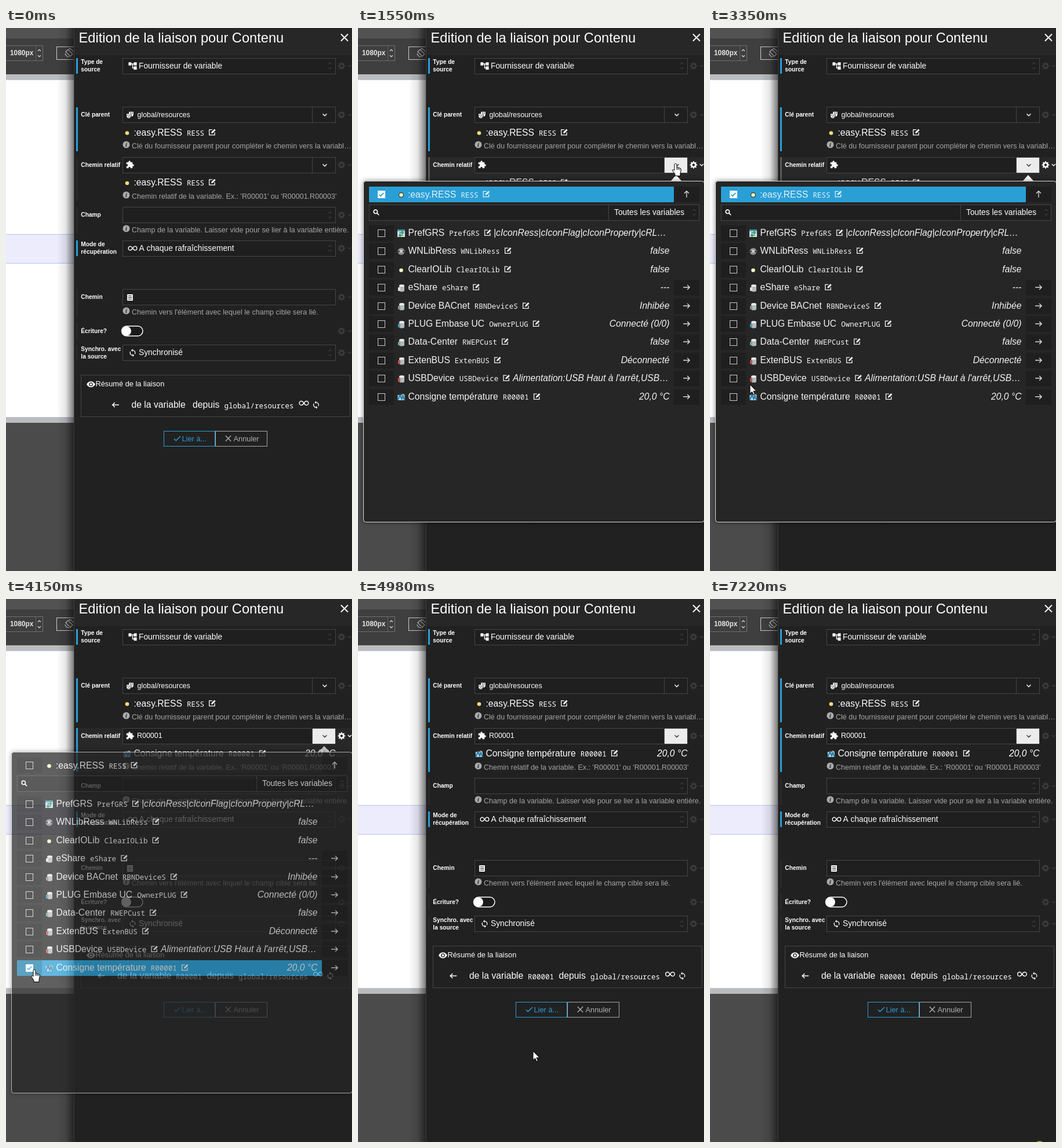
Write an HTML page with a canvas that moves like this. It is 597 px wide and 938 px high and loops after 7.29 s.

```html
<!DOCTYPE html>
<html lang="fr">
<head>
<meta charset="utf-8">
<style>
html, body { margin: 0; width: 100%; height: 100%; overflow: hidden; background: #212121; }
canvas { display: block; }
</style>
</head>
<body>
<canvas id="stage" width="597" height="938"></canvas>
<script>
const LOOP = 7290, W = 597, H = 938;
const BLUE = '#2a9fd6', EDGE = '#454545', FIELD = '#1f1f1f', CELL = '#1f1f1f', DIM = '#3b3b3b';
const SANS = '"Liberation Sans", Arial, sans-serif';
const MONO = '"Noto Sans Mono", "DejaVu Sans Mono", monospace';
const stage = document.getElementById('stage').getContext('2d');
const layer = Object.assign(document.createElement('canvas'), { width: W, height: H });
const popup = layer.getContext('2d');
let g = stage;

// Icons on a 24 unit grid
const ICON = {
  tree: 'M22 11V3h-7v3H9V3H2v8h7V8h2v10h4v3h7v-8h-7v3h-2V8h2v3z',
  puzzle: 'M20.5 11H19V7c0-1.1-.9-2-2-2h-4V3.5a2.5 2.5 0 0 0-5 0V5H4a2 2 0 0 0-2 2v3.8h1.5a2.7 2.7 0 0 1 0 5.4H2V20a2 2 0 0 0 2 2h3.8v-1.5a2.7 2.7 0 0 1 5.4 0V22H17a2 2 0 0 0 2-2v-4h1.5a2.5 2.5 0 0 0 0-5z',
  sync: 'M12 4V1L8 5l4 4V6a6 6 0 0 1 5.3 8.8l1.46 1.46A8 8 0 0 0 12 4zM12 18a6 6 0 0 1-5.3-8.8L5.24 7.74A8 8 0 0 0 12 20v3l4-4-4-4z',
  eye: 'M12 4.5C7 4.5 2.7 7.6 1 12c1.7 4.4 6 7.5 11 7.5s9.3-3.1 11-7.5c-1.7-4.4-6-7.5-11-7.5zM12 7a5 5 0 1 1 0 10a5 5 0 1 1 0-10zM12 9a3 3 0 1 1 0 6a3 3 0 1 1 0-6z',
  list: 'M3 2H21V22H3zM6 6V8H18V6zM6 11V13H18V11zM6 16V18H18V16z',
  masks: 'M9 3H22V11Q21 17 16 17V9H9zM12 5.5V7.5H15V5.5zM17 5.5V7.5H20V5.5zM2 9H14V16Q13 22 8 22T2 16zM4 12V14H7V12zM9 12V14H12V12zM5 19H11L8 16.5z',
  pencil: 'M8 16L9 11.5 17.5 3 21 6.5 12.5 15z'
};
const LINE = {
  infinity: 'M12 12C9.5 8.5 8 7 6 7a5 5 0 0 0 0 10C8.5 17 10 15 12 12S15.5 7 18 7a5 5 0 0 1 0 10C16 17 14.5 15.5 12 12',
  sheet: 'M13 4H4V20H20V12',
  down: 'M6 9L12 15 18 9', up: 'M6 15L12 9 18 15',
  cross: 'M4 4L20 20M20 4L4 20', check: 'M2 13L8 19 22 5',
  left: 'M22 12H3M10 5L3 12 10 19', right: 'M2 12H21M14 5L21 12 14 19', rise: 'M12 22V3M5 10L12 3 19 10',
  search: 'M15 15L22 22M16.5 9.5a7 7 0 1 0-14 0a7 7 0 1 0 14 0'
};
const ARROW = new Path2D('M0 0V15.5L3.6 12.3 6 17.8 8.3 16.8 6 11.3H11z');
const HAND = new Path2D('M-2 1.5Q0-1.5 2 1.5V6.5L7.5 8Q9.5 8.5 9.5 11L8 17.5V21.5H-1V18.5L-5.5 12Q-5.5 9.5-2 12z');

function rect(x, y, w, h, fill, edge) {
  if (fill) { g.fillStyle = fill; g.fillRect(x, y, w, h); }
  if (edge) { g.strokeStyle = edge; g.lineWidth = 1; g.strokeRect(x + .5, y + .5, w - 1, h - 1); }
}
function disc(x, y, r, fill) {
  g.fillStyle = fill;
  g.beginPath(); g.arc(x, y, r, 0, 7); g.fill();
}
// y is the middle of the capitals; returns the right end
function text(s, x, y, size, color = '#fff', style = '', family = SANS, align = 'left') {
  g.font = `${style} ${size}px ${family}`;
  g.textAlign = align;
  g.fillStyle = color;
  g.fillText(s, x, Math.round(y + size * .36));
  return x + g.measureText(s).width;
}
const mono = (s, x, y, color) => text(s, x, y, 12.5, color, '', MONO);
function icon(name, x, y, size, color = '#fff', weight = 1.4) {
  g.save();
  g.translate(x - size / 2, y - size / 2);
  g.scale(size / 24, size / 24);
  if (ICON[name]) {
    g.fillStyle = color;
    g.fill(new Path2D(ICON[name]), 'evenodd');
  } else {
    g.strokeStyle = color;
    g.lineWidth = weight * 24 / size;
    g.stroke(new Path2D(LINE[name]));
  }
  g.restore();
}
function edit(x, y, color) {
  icon('sheet', x, y, 14, color, 1.3);
  icon('pencil', x + 1, y - .5, 14, color);
}
function sorter(x, y) {
  icon('up', x, y - 4, 11, '#505050', 1);
  icon('down', x, y + 4, 11, '#505050', 1);
}
function gear(x, y, color) {
  g.fillStyle = color;
  g.beginPath();
  for (let i = 0; i < 32; i++) {
    const r = i % 4 < 2 ? 6.5 : 4.7, a = (i - .5) * Math.PI / 16;
    g.lineTo(x + r * Math.cos(a), y + r * Math.sin(a));
  }
  g.closePath();
  g.moveTo(x + 2.2, y);
  g.arc(x, y, 2.2, 0, 7);
  g.fill('evenodd');
  icon('down', x + 14, y, 12, color, 1.4);
}
function hint(s, y) {
  disc(207.5, y - 1.5, 6, '#aaa');
  text('i', 207.5, y - 2, 10.5, '#222', 'italic bold', '"Liberation Serif", serif', 'center');
  text(s, 217, y, 12.55, '#a6a6a6');
}
function named(name, id, x, y, color) {
  const end = mono(id, text(name, x, y, 15.7, color) + 8, y + 1, color);
  edit(end + 13.5, y, color);
}
function cylinder(x, y, accent) {
  rect(x - 4, y - 4, 9, 9, '#b4bbbe');
  g.fillStyle = '#e6ebec';
  g.beginPath(); g.ellipse(x + .5, y - 4, 4.5, 2, 0, 0, 7); g.fill();
  g.fillStyle = '#b4bbbe';
  g.beginPath(); g.ellipse(x + .5, y + 4.5, 4.5, 2, 0, 0, 7); g.fill();
  rect(x - 6, y - 1, 4, 6, accent);
}
function wave(x, y) {
  rect(x - 6, y - 4, 12, 9, '#b5d5dc');
  disc(x + 3, y - 3, 3, '#8fb389');
  g.strokeStyle = '#1f78b8'; g.lineWidth = 2;
  g.stroke(new Path2D(`M${x - 6} ${y + 5}L${x - 2} ${y - 4} ${x + 1} ${y + 3} ${x + 3} ${y - 2} ${x + 6} ${y + 5}`));
}

// label lines, top, bottom, control centre, marked as set
const ROWS = [
  [['Type de', 'source'], 52, 79, 65.5, 1], [['Clé parent'], 137, 213, 150, 1],
  [['Chemin relatif'], 223, 299, 236.5, 0], [['Champ'], 309, 356, 323, 0],
  [['Mode de', 'récupération'], 367, 394, 380.5, 1], [['Chemin'], 451, 499, 465, 0],
  [['Écriture?'], 509, 538, 523.5, 0], [['Synchro. avec', 'la source'], 548, 575, 561, 0]
];

function page() {
  rect(0, 0, 118, H, '#4b4b4b');
  rect(0, 0, 118, 18, '#525252');
  rect(0, 18, 118, 62, '#3f3f3f');
  rect(0, 80, 118, 602, '#bcbcbc');
  rect(0, 89, 118, 583, '#fff');
  rect(0, 357, 118, 50, '#ececfd');
  for (const y of [89, 356, 406, 672]) rect(0, y, 118, 1, '#b4c4ee');
  rect(-1, 30, 65, 27, null, '#707070');
  rect(51, 31, 1, 25, '#606060');
  text('1080px', 7, 43, 11.9, '#e4e4e4', 'bold');
  icon('up', 57.5, 38.5, 10, '#ddd', 1.2);
  icon('down', 57.5, 48.5, 10, '#ddd', 1.2);
  rect(87, 32, 40, 23, null, '#cfcfcf');
  g.strokeStyle = '#ccc'; g.lineWidth = 1.2;
  g.stroke(new Path2D('M107 37L115 45 111 49 103 41zM102 44a7 7 0 0 0 7 6M116 41a7 7 0 0 0-8-5'));
  const shade = g.createLinearGradient(88, 0, 118, 0);
  shade.addColorStop(0, 'rgba(0,0,0,0)');
  shade.addColorStop(.5, 'rgba(0,0,0,.1)');
  shade.addColorStop(1, 'rgba(0,0,0,.55)');
  rect(88, 0, 30, H, shade);
}

function form(hover, opened, chosen) {
  rect(117, 0, 480, H, '#212121');
  rect(117, 0, 480, 47, '#272727');
  rect(117, 0, 1, H, '#3c3c3c');
  text('Edition de la liaison pour Contenu', 125.5, 16.7, 23.66);
  icon('cross', 584, 16.5, 18, '#fff', 2);

  ROWS.forEach(([lines, top, bottom, y, set], i) => {
    const hot = i === hover;
    if (hot) rect(121, top, 476, bottom - top, '#282828');
    rect(121, top, 3, bottom - top, set || i === 2 && chosen ? BLUE : hot ? '#5a5a5a' : '#292929');
    lines.forEach((s, k) => text(s, 129.3, y - .5 + (lines.length > 1 ? k * 13 - 6.5 : 0), 10.2, '#fff', 'bold'));
    gear(579, y, hot ? '#fff' : DIM);
    if (i !== 6) rect(201, Math.round(y - 14), 368, 28, FIELD, EDGE);
    if ([0, 3, 4, 7].includes(i)) sorter(559, y);
  });

  icon('tree', 218.5, 65.5, 17);
  text('Fournisseur de variable', 229, 65.3, 13.8);

  for (const y of [150, 237]) {
    const lit = opened && y > 200;
    rect(528, y - 13, 1, 26, EDGE);
    if (lit) rect(529, y - 13, 39, 26, '#ececec');
    icon('down', 550, y, 14, lit ? '#333' : '#fff', 1.4);
  }
  icon('masks', 214, 150, 14);
  text('global/resources', 226.5, 149.8, 12.45);
  disc(209, 181.5, 3.3, '#f3dc7c');
  named(':easy.RESS', 'RESS', 220.5, 180.3, '#fff');
  hint('Clé du fournisseur parent pour compléter le chemin vers la variabl…', 203);

  icon('puzzle', 214, 236, 15);
  if (chosen) {
    text('R00001', 226, 236, 12.45);
    wave(209, 268);
    named('Consigne température', 'R00001', 220.5, 266.5, '#fff');
    text('20,0 °C', 568.5, 266.5, 15.7, '#fff', 'italic', SANS, 'right');
  } else {
    disc(209, 268, 3.3, '#f3dc7c');
    named(':easy.RESS', 'RESS', 220.5, 266.5, '#fff');
  }
  hint("Chemin relatif de la variable. Ex.: 'R00001' ou 'R00001.R00003'", 290);
  hint('Champ de la variable. Laisser vide pour se lier à la variable entière.', 348);

  icon('infinity', 218.5, 380.5, 16, '#fff', 1.4);
  text('A chaque rafraîchissement', 229.5, 380.5, 13.8);
  icon('list', 214, 465.5, 13);
  hint("Chemin vers l'élément avec lequel le champ cible sera lié.", 490);

  g.strokeStyle = '#fff'; g.lineWidth = 1.5;
  g.fillStyle = '#1a1a1a';
  g.beginPath(); g.roundRect(199.5, 515, 36.5, 17, 8.5); g.fill(); g.stroke();
  disc(208, 523.5, 8, '#fff');
  icon('sync', 218.5, 561, 15);
  text('Synchronisé', 229, 560.5, 13.8);

  rect(129, 599, 465, 73, null, EDGE);
  icon('eye', 146.5, 615.5, 16);
  text('Résumé de la liaison', 154.5, 614.7, 12.8);
  const d = chosen ? 24.5 : 0;
  icon('left', 189 - d, 651, 14, '#fff', 1.5);
  text('de la variable', 216.5 - d, 650.7, 15.7);
  if (chosen) mono('R00001', 293, 652, '#fff');
  text('depuis', 322 + d, 650.7, 15.7);
  mono('global/resources', 376.5 + d, 652, '#fff');
  icon('infinity', 514 + d, 648, 17, '#fff', 1.4);
  icon('sync', 535 + d, 651, 15);

  rect(361, 696, 90, 27, null, '#a8a8a8');
  rect(272, 696, 89, 27, null, BLUE);
  icon('check', 295.5, 709, 13, BLUE, 1.5);
  text('Lier à...', 303.5, 709, 12.8, BLUE);
  icon('cross', 383.5, 709, 14, '#b0b0b0', 1.4);
  text('Annuler', 392.5, 709, 12.8, '#b0b0b0');
}

// name, identifier, value, opens a sub level, icon accent
const ITEMS = [
  ['PrefGRS', 'PrefGRS', '|cIconRess|cIconFlag|cIconProperty|cRL…', 0, '#3c9a62'],
  ['WNLibRess', 'WNLibRess', 'false', 0],
  ['ClearIOLib', 'ClearIOLib', 'false', 0],
  ['eShare', 'eShare', '---', 1, '#dfe5e6'],
  ['Device BACnet', 'RBNDeviceS', 'Inhibée', 1, '#8b8f91'],
  ['PLUG Embase UC', 'OwnerPLUG', 'Connecté (0/0)', 1, '#4d9ab0'],
  ['Data-Center', 'RWEPCust', 'false', 1, '#77a596'],
  ['ExtenBUS', 'ExtenBUS', 'Déconnecté', 1, '#c0574e'],
  ['USBDevice', 'USBDevice', "Alimentation:USB Haut à l'arrêt,USB…", 1, '#c0574e'],
  ['Consigne température', 'R00001', '20,0 °C', 1]
];

function box(y, on, fill) {
  rect(19, y - 13, 43, 27, fill);
  rect(34, y - 6, 13, 13, on ? '#fff' : null, on ? '#fff' : '#ccc');
  if (on) icon('check', 40.5, y + .5, 9, BLUE, 1.8);
}
function itemIcon(i, y, accent) {
  if (i === 0) {
    rect(68, y - 6, 13, 13, '#cfe3e6');
    rect(68, y - 6, 13, 3, '#4a90b8');
    icon('right', 75, y - .5, 9, accent, 2);
    icon('left', 74, y + 4, 8, accent, 2);
  } else if (i === 1) {
    disc(74.5, y + 1, 6, '#8e8e8e');
    rect(69, y, 11, 2, '#333');
    rect(72, y - 2, 5, 5, '#c8c8c8');
  } else if (i === 2) disc(74.5, y + 1.5, 3.3, '#fbf6c0');
  else if (i === 9) wave(74.5, y + 1);
  else cylinder(75, y + 1, accent);
}

function list(chosen) {
  g.clearRect(0, 0, W, H);
  g.fillStyle = '#fff';
  g.fill(new Path2D('M549 254L559 265H539z'));
  g.shadowColor = 'rgba(0,0,0,.5)'; g.shadowBlur = 8;
  g.fillStyle = '#262626';
  g.beginPath(); g.roundRect(9.5, 264.5, 588, 589, 4); g.fill();
  g.shadowBlur = 0;
  g.strokeStyle = '#dedede'; g.lineWidth = 1; g.stroke();

  if (!chosen) rect(19, 274, 526, 27, BLUE);
  box(287, !chosen, chosen ? CELL : BLUE);
  disc(74.5, 288.5, 4.5, '#333');
  disc(74.5, 288.5, 3.3, '#fbf6c0');
  named(':easy.RESS', 'RESS', 86, 287, chosen ? '#fff' : '#e2f2fa');
  rect(545, 274, 44, 27, CELL);
  icon('rise', 567, 287, 14, '#ddd', 1.3);

  rect(19, 305, 414, 28, FIELD, EDGE);
  rect(432, 305, 157, 28, FIELD, EDGE);
  icon('search', 31.5, 318.5, 11, '#fff', 1.6);
  text('Toutes les variables', 442, 318, 13.8);
  sorter(580, 318.5);

  ITEMS.forEach(([name, id, value, deep, accent], i) => {
    const y = Math.round(354 + i * 31.4), on = chosen && i === 9;
    if (on) rect(19, y - 13, 526, 27, BLUE);
    box(y, on, on ? '#2180ad' : CELL);
    itemIcon(i, y, accent);
    named(name, id, 86.5, y - .3, '#f4f4f4');
    const start = { 0: 234, 8: 267 }[i];
    text(value, start || 537.5, y - .3, 15.7, '#f4f4f4', 'italic', SANS, start ? 'left' : 'right');
    if (deep) {
      rect(545, y - 13, 44, 27, CELL);
      icon('right', 567, y, 14, '#ddd', 1.3);
    }
  });
}

// start, end, steps, x, y
const MOVES = [
  [550, 1220, 11, 548, 234], [1960, 2020, 2, 536, 242], [2220, 2220, 1, 535, 242],
  [2630, 3350, 12, 69, 616], [3430, 3550, 3, 48, 637], [3690, 3890, 4, 49, 640],
  [4510, 4980, 8, 302, 781], [6630, 6970, 5, 568, 946]
];
function pointer(t) {
  let x = 568, y = 917;
  for (const [a, b, n, tx, ty] of MOVES) {
    if (t < a) break;
    const k = b > a ? Math.min(n, 1 + Math.floor((t - a) / (b - a) * (n - 1) + .001)) : n;
    const u = k / n, e = u * u * (3 - 2 * u);
    x += (tx - x) * e;
    y += (ty - y) * e;
  }
  return [x, y];
}

function draw(t) {
  const [x, y] = pointer(t);
  const opened = t >= 1550, chosen = t >= 4150;
  const hover = t < 550 || t >= 4360 ? -1 : opened ? 2 : ROWS.findIndex(r => y >= r[1] && y < r[2]);
  g = stage;
  page();
  form(hover, opened, chosen);
  const alpha = !opened || t >= 4360 ? 0 : !chosen ? 1 : t < 4220 ? .73 : t < 4290 ? .48 : .24;
  if (alpha) {
    g = popup;
    list(chosen);
    g = stage;
    g.globalAlpha = alpha;
    g.drawImage(layer, 0, 0);
    g.globalAlpha = 1;
  }
  if (t >= 7220) disc(568.5, 944.6, 8.6, '#8f9a1e');
  if (t < 550) return;
  const hand = t < 1960 && y < 251 || t >= 3430 && t < 4360 && x < 62;
  g.save();
  g.translate(x, y);
  g.fillStyle = '#fff'; g.strokeStyle = '#000'; g.lineWidth = 1;
  const shape = hand ? HAND : ARROW;
  g.fill(shape); g.stroke(shape);
  if (hand) g.stroke(new Path2D('M2 6.5V11M4.5 7.5V11M7 8.5V11.5'));
  g.restore();
}

function tick() {
  draw(performance.now() % LOOP);
  requestAnimationFrame(tick);
}
tick();
</script>
</body>
</html>
```
